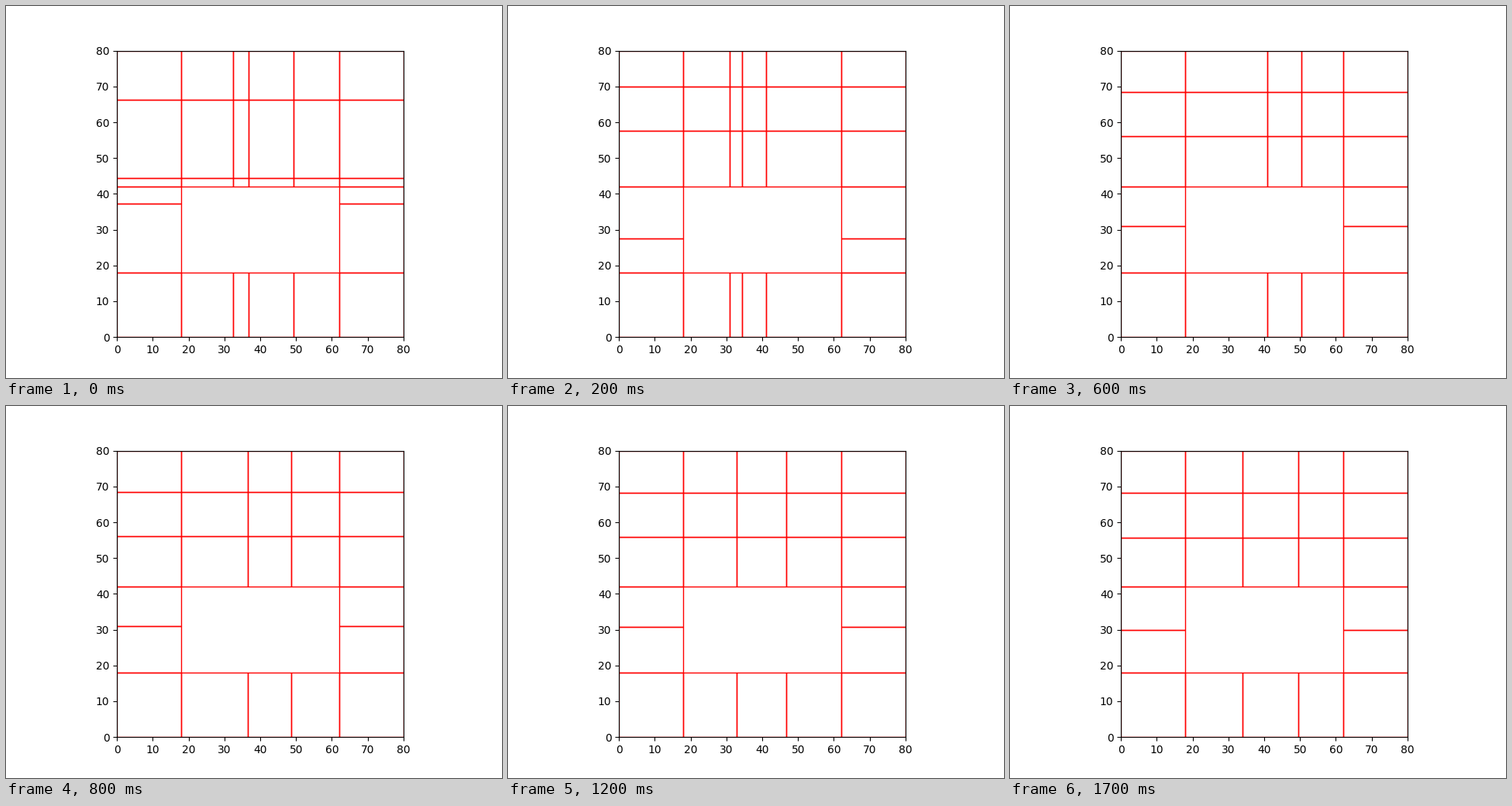
A matplotlib script for the animation above (1800 ms loop, 640 by 480 pixels).

```python
import random
from math import cos, pi, radians, sin

import matplotlib.pyplot as plt
from matplotlib.animation import FuncAnimation
from matplotlib.patches import Rectangle

SIZE = 80
HOLE_X = (18, 62)
HOLE_Y = (18, 42)
FRAMES = 18
INTERVAL = 100

# Key layouts of the wide search, two steps apart:
# three vertical cuts, then three horizontal cuts.
KEYS = [
    (32.4, 36.8, 49.3, 66.3, 44.4, 37.3),
    (30.9, 34.4, 41.1, 70.0, 57.6, 27.5),
    (6.9, 35.7, 45.6, 68.4, 56.1, 31.0),
]
SEARCH_END = 2 * (len(KEYS) - 1)


def search(step):
    """Jump between key layouts; odd steps mix the cuts of both neighbours."""
    before, after = KEYS[step // 2], KEYS[(step + 1) // 2]
    rng = random.Random(step)
    cuts = [rng.choice(pair) for pair in zip(before, after)]
    return cuts[:3], cuts[3:]


def settle(step):
    """Damped swings and slow drifts towards the final layout."""
    damping = ((FRAMES - 1 - step) / 9) ** 2
    vertical = [
        33.95 - 5 * damping * cos(radians(40 * (step - 11))),
        49.5 - 2.8 * sin(pi * (step - 7) / 10),
    ]
    horizontal = [
        68.56 - 0.02 * step,
        56.43 - 0.05 * step,
        30 + cos(pi * max(step - 11, 0) / 4),
    ]
    return vertical, horizontal


def spans(cuts, hole):
    edges = sorted({0, SIZE, *hole, *cuts})
    return list(zip(edges, edges[1:]))


def inside(span, hole):
    return hole[0] <= span[0] and span[1] <= hole[1]


fig, ax = plt.subplots(figsize=(6.4, 4.8), dpi=100)
ax.set_aspect("equal")
ax.set(xlim=(0, SIZE), ylim=(0, SIZE),
       xticks=range(0, SIZE + 1, 10), yticks=range(0, SIZE + 1, 10))


def draw(step):
    for patch in list(ax.patches):
        patch.remove()
    vertical, horizontal = search(step) if step <= SEARCH_END else settle(step)
    for xs in spans(vertical, HOLE_X):
        for ys in spans(horizontal, HOLE_Y):
            if inside(xs, HOLE_X) and inside(ys, HOLE_Y):
                continue
            ax.add_patch(Rectangle((xs[0], ys[0]), xs[1] - xs[0], ys[1] - ys[0],
                                   fill=False, edgecolor="red", linewidth=1))
    return ax.patches


anim = FuncAnimation(fig, draw, frames=FRAMES, interval=INTERVAL,
                     init_func=lambda: [], repeat=True, repeat_delay=0)
plt.show()
```
